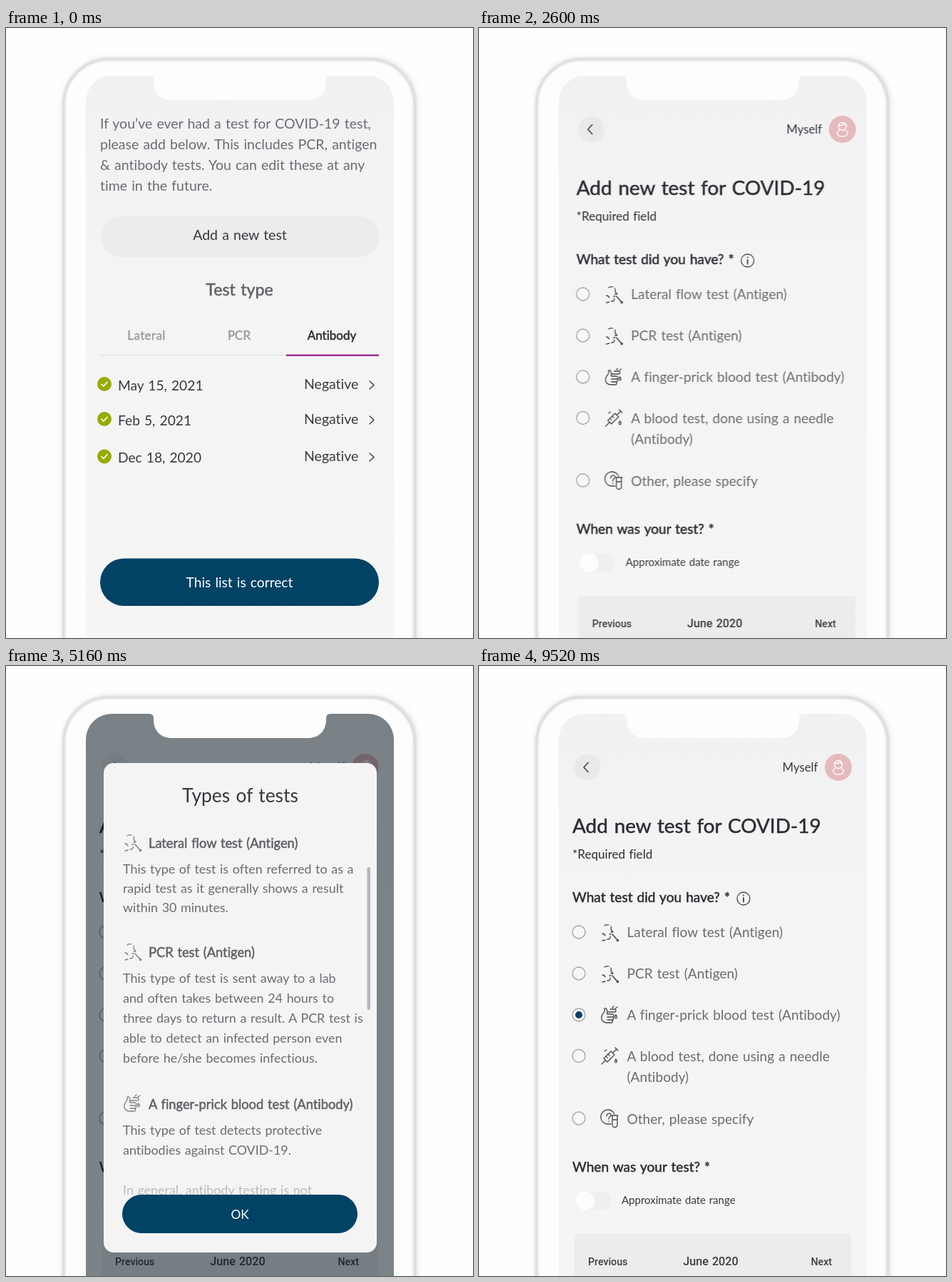
Write an HTML page that moves like this. It is 655 px wide and 855 px high and loops after 9560 ms.

```html
<!DOCTYPE html>
<html lang="en">
<head>
<meta charset="utf-8">
<title>Add a test</title>
<style>
  html, body { margin: 0; width: 100%; height: 100%; overflow: hidden; background: #fefefe; }
  svg { display: block; }
  text { font: 19.5px Lato, sans-serif; font-variant-ligatures: none; word-spacing: .06em; fill: #6a6c70; }
  .form text { font-size: 19.1px; }
  .dark { fill: #37393d; }
  .white { fill: #fff; }
  .mid { text-anchor: middle; }
  .bold { stroke: currentColor; stroke-width: .5px; }
  .ink { fill: #2b2d31; color: #2b2d31; }
  .grey { fill: #5e6064; color: #5e6064; }
  .pale { fill: #999b9e; color: #999b9e; }
  .date { font-size: 19.2px; }
  .tab { font-size: 17px; }
  .h2 { font-size: 26.4px; }
  .h3 { font-size: 23.2px; }
  .small { font-size: 17.2px; }
  .head { font-size: 18.3px; }
  .body { font-size: 17.9px; }
  .form .h1 { font-size: 27.9px; }
  .form .small { font-size: 17.1px; }
  .form .tiny { font-size: 15px; }
  .form .name { font-size: 16.8px; }
  .form .cal { font: 500 14.2px Roboto, sans-serif; fill: #3c3e42; }
  .form .month { font-size: 16.2px; }
  .line { fill: none; stroke: #44464a; stroke-width: 1.3; stroke-linecap: round; stroke-linejoin: round; }
  .navy { fill: #024365; }
  .ring { fill: #f7f7f8; stroke: #a4a6a9; stroke-width: 1.4; }

  .anim { animation: 9560ms linear infinite; }
  .press { animation-name: press; }
  .out { animation-name: out; }
  .in { animation-name: in; }
  .modal { animation-name: modal; }
  .pick { animation-name: pick; }
  @keyframes press {
    0%, 6.49% { opacity: 0; animation-timing-function: ease-in-out; }
    16.53%, 100% { opacity: 1; }
  }
  @keyframes out {
    0%, 17.78% { transform: none; animation-timing-function: ease-in-out; }
    28.03%, 100% { transform: translateX(-450px); }
  }
  @keyframes in {
    0%, 17.78% { transform: translateX(450px); animation-timing-function: ease-in-out; }
    28.03%, 100% { transform: none; }
  }
  @keyframes modal {
    0%, 38.49% { opacity: 0; animation-timing-function: ease-in-out; }
    48.54% { opacity: 1; }
    63.7% { opacity: 1; animation-timing-function: ease-in-out; }
    72.7%, 100% { opacity: 0; }
  }
  @keyframes pick {
    0%, 74.06% { opacity: 0; animation-timing-function: ease-in-out; }
    93.1%, 100% { opacity: 1; }
  }
</style>
</head>
<body>
<svg width="655" height="855" viewBox="0 0 655 855">
  <defs>
    <filter id="soft" x="-10%" y="-10%" width="120%" height="120%"><feGaussianBlur stdDeviation="5"/></filter>
    <filter id="edge" x="-10%" y="-10%" width="120%" height="120%"><feGaussianBlur stdDeviation="1.8"/></filter>
    <linearGradient id="glass" x2="0" y2="1">
      <stop offset="0" stop-color="#f1f1f3"/>
      <stop offset=".3" stop-color="#f4f4f5"/>
      <stop offset="1" stop-color="#f5f5f5"/>
    </linearGradient>
    <linearGradient id="fade" x2="0" y2="1">
      <stop offset="0" stop-color="#f4f4f5" stop-opacity=".3"/>
      <stop offset="1" stop-color="#f4f4f5"/>
    </linearGradient>
    <clipPath id="screen">
      <path d="M112 103a36 36 0 0 1 36-36H201q6 0 6 6v2c0 16 10 26 26 26H423c16 0 26-10 26-26v-2q0-6 6-6H508a36 36 0 0 1 36 36V900H112z"/>
    </clipPath>

    <g id="tick">
      <circle r="10" fill="#97ab00"/>
      <path d="M-4 .3-1.2 3 4-2.6" fill="none" stroke="#fff" stroke-width="1.6" stroke-linecap="round"/>
    </g>
    <path id="next" class="line" style="stroke-width:1.6" d="M-3-5.5 3 0-3 5.5"/>
    <!-- icons, centred on their own origin -->
    <g id="swab" class="line">
      <path d="M-8-10Q-5-12-2-11M1-9Q2-7 1-5L4-1H1M-1 2H1M0 5Q1 9-4 9M-7 10-11 11M-11 1Q-8 1-7 4"/>
      <path d="M3 2 10 10" stroke-width="1.6"/>
      <circle cx="10.5" cy="10.5" r="1.2"/>
    </g>
    <g id="hand" class="line">
      <path d="M-3-4Q-4-11-7-9-6-5-9-2C-14 5-10 11-3 11H2a2 2 0 0 0 1-4 2 2 0 0 0 1-4 2 2 0 0 0 0-4H-3Q-4-1-3-4H7a2 2 0 0 0 0-4H1"/>
      <path d="M-3 3H3M-3 7H3M4-10 6-12M8-9 11-11M9 0q3 4 0 5-3-1 0-5"/>
    </g>
    <g id="needle" class="line">
      <path d="M-11 11-6 6M-8 3-3 8 7-2 2-7zM5-5 10-10M8-12 12-8M-2-3 0-1M-5 0-3 2M-7-7-4-9M9 4q3 4 0 5-3-1 0-5"/>
    </g>
    <g id="other" class="line">
      <path d="M7-6A10 10 0 1 0-2 8H2M-4-3c0-5 7-5 6-1-1 2-3 2-3 5M-1 4V4.5"/>
      <path d="M3-4H12M4-4V9a3.5 3.5 0 0 0 7 0V-4M4 2H11"/>
    </g>
  </defs>

  <rect width="655" height="855" fill="#fefefe"/>
  <rect x="81" y="43" width="495" height="900" rx="64" fill="#c9cacc" opacity=".65" filter="url(#soft)"/>
  <rect x="80" y="43" width="494" height="900" rx="64" fill="#fdfdfd"/>
  <rect x="81" y="44" width="492" height="900" rx="63" fill="none" stroke="#cfd0d2" stroke-width="3" filter="url(#edge)"/>

  <g clip-path="url(#screen)">
    <rect x="112" y="67" width="432" height="800" fill="url(#glass)"/>

    <!-- test list -->
    <g class="anim out">
      <text x="132" y="141">If you’ve ever had a test for COVID-19 test,</text>
      <text x="132" y="170">please add below. This includes PCR, antigen</text>
      <text x="132" y="199">&amp; antibody tests. You can edit these at any</text>
      <text x="132" y="228">time in the future.</text>

      <rect x="133" y="264" width="391" height="57" rx="28.5" fill="#ececed"/>
      <text x="328" y="297" class="mid dark">Add a new test</text>
      <g class="anim press">
        <rect x="132" y="264" width="391" height="57" rx="28.5" class="navy"/>
        <text x="328" y="297" class="mid white">Add a new test</text>
      </g>

      <text x="327.5" y="375" class="mid h3 bold grey">Test type</text>
      <text x="197" y="437" class="mid tab bold pale" letter-spacing=".4">Lateral</text>
      <text x="327" y="437" class="mid tab bold pale">PCR</text>
      <text x="457" y="437" class="mid tab bold ink">Antibody</text>
      <path d="M132 458.5H523" stroke="#dcdddf"/>
      <path d="M393 458.7H523" stroke="#9b2f95" stroke-width="2.5"/>

      <use href="#tick" x="138" y="499"/>
      <text x="157" y="508" class="date dark">May 15, 2021</text>
      <text x="418" y="505.5" class="dark">Negative</text>
      <use href="#next" x="513" y="500.5"/>
      <use href="#tick" x="138" y="548"/>
      <text x="157" y="557" class="date dark">Feb 5, 2021</text>
      <text x="418" y="554.5" class="dark">Negative</text>
      <use href="#next" x="513" y="549.5"/>
      <use href="#tick" x="138" y="600.5"/>
      <text x="157" y="609" class="date dark">Dec 18, 2020</text>
      <text x="418" y="607" class="dark">Negative</text>
      <use href="#next" x="513" y="601.5"/>

      <rect x="132" y="743.5" width="391" height="66.5" rx="33.25" class="navy"/>
      <text x="327.5" y="784" class="mid white date">This list is correct</text>
    </g>

    <!-- new test form -->
    <g class="anim in form">
      <circle cx="152" cy="142" r="18.5" fill="#e9e9ea"/>
      <path class="line" style="stroke-width:1.7" d="M153 135.500 147 142 153 148.500"/>
      <text x="425.5" y="148" class="dark name">Myself</text>
      <circle cx="504" cy="142" r="19" fill="#e5babd"/>
      <g fill="none" stroke="#fff" stroke-width="1.4">
        <circle cx="504" cy="138" r="5.5"/>
        <path d="M498.5 137q6 0 8-3 1 2 3 3M500 143c-6 4-3 9 4 9s10-5 4-9"/>
      </g>

      <text x="131" y="234" class="h1 bold ink">Add new test for COVID-19</text>
      <text x="131" y="270" class="small ink">*Required field</text>
      <text x="131" y="331" class="bold ink">What test did you have? *</text>
      <circle cx="371" cy="326" r="9" class="line"/>
      <path class="line" d="M371 325V330.5M371 321.5V321.7" style="stroke-width:1.8"/>

      <circle cx="140" cy="373" r="9" class="ring"/>
      <use href="#swab" x="184" y="374"/>
      <text x="207.5" y="380">Lateral flow test (Antigen)</text>
      <circle cx="140" cy="431" r="9" class="ring"/>
      <use href="#swab" x="184" y="432"/>
      <text x="207.5" y="438">PCR test (Antigen)</text>
      <circle cx="140" cy="489" r="9" class="ring"/>
      <circle cx="140" cy="489" r="5" class="navy anim pick"/>
      <use href="#hand" x="183" y="489"/>
      <text x="207.5" y="496">A finger-prick blood test (Antibody)</text>
      <circle cx="140" cy="546.5" r="9" class="ring"/>
      <use href="#needle" x="183" y="547"/>
      <text x="207.5" y="554">A blood test, done using a needle</text>
      <text x="207.5" y="582.5">(Antibody)</text>
      <circle cx="140" cy="634" r="9" class="ring"/>
      <use href="#other" x="183" y="634"/>
      <text x="207.5" y="641.5">Other, please specify</text>

      <text x="131" y="709" class="bold ink">When was your test? *</text>
      <rect x="136" y="737" width="50" height="25" rx="12.5" fill="#efeff0"/>
      <circle cx="149" cy="749.5" r="13" fill="#fdfdfd"/>
      <text x="200" y="754" class="tiny dark">Approximate date range</text>

      <rect x="134" y="796" width="388" height="80" rx="4" fill="#ececed"/>
      <text x="153" y="840" class="cal">Previous</text>
      <text x="325" y="840" class="cal month mid">June 2020</text>
      <text x="465.5" y="840" class="cal">Next</text>
    </g>

    <!-- test types dialog -->
    <rect x="112" y="67" width="432" height="800" fill="rgb(5,18,26)" fill-opacity=".5" class="anim modal"/>
    <g class="anim modal">
      <rect x="137" y="136" width="383" height="686" rx="14" fill="#f4f4f5"/>
      <text x="328.5" y="191" class="mid h2 dark">Types of tests</text>

      <use href="#swab" x="178" y="248" opacity=".65"/>
      <text x="200" y="255" class="head bold grey">Lateral flow test (Antigen)</text>
      <text x="164" y="291" class="body">This type of test is often referred to as a</text>
      <text x="164" y="318" class="body">rapid test as it generally shows a result</text>
      <text x="164" y="344.5" class="body">within 30 minutes.</text>

      <use href="#swab" x="178" y="401" opacity=".65"/>
      <text x="200" y="408" class="head bold grey">PCR test (Antigen)</text>
      <text x="164" y="444" class="body">This type of test is sent away to a lab</text>
      <text x="164" y="472" class="body">and often takes between 24 hours to</text>
      <text x="164" y="500" class="body">three days to return a result. A PCR test is</text>
      <text x="164" y="528" class="body">able to detect an infected person even</text>
      <text x="164" y="556" class="body">before he/she becomes infectious.</text>

      <use href="#hand" x="177" y="613" opacity=".65"/>
      <text x="200" y="621" class="head bold grey">A finger-prick blood test (Antibody)</text>
      <text x="164" y="657" class="body">This type of test detects protective</text>
      <text x="164" y="685" class="body">antibodies against COVID-19.</text>
      <text x="164" y="741" class="body">In general, antibody testing is not</text>
      <rect x="150" y="715" width="350" height="50" fill="url(#fade)"/>

      <rect x="506.5" y="282" width="4.5" height="200" rx="2.25" fill="#b4b6b9"/>
      <rect x="163" y="741" width="330" height="54" rx="27" class="navy"/>
      <text x="328" y="774.5" class="mid small white">OK</text>
    </g>
  </g>
</svg>
</body>
</html>
```
